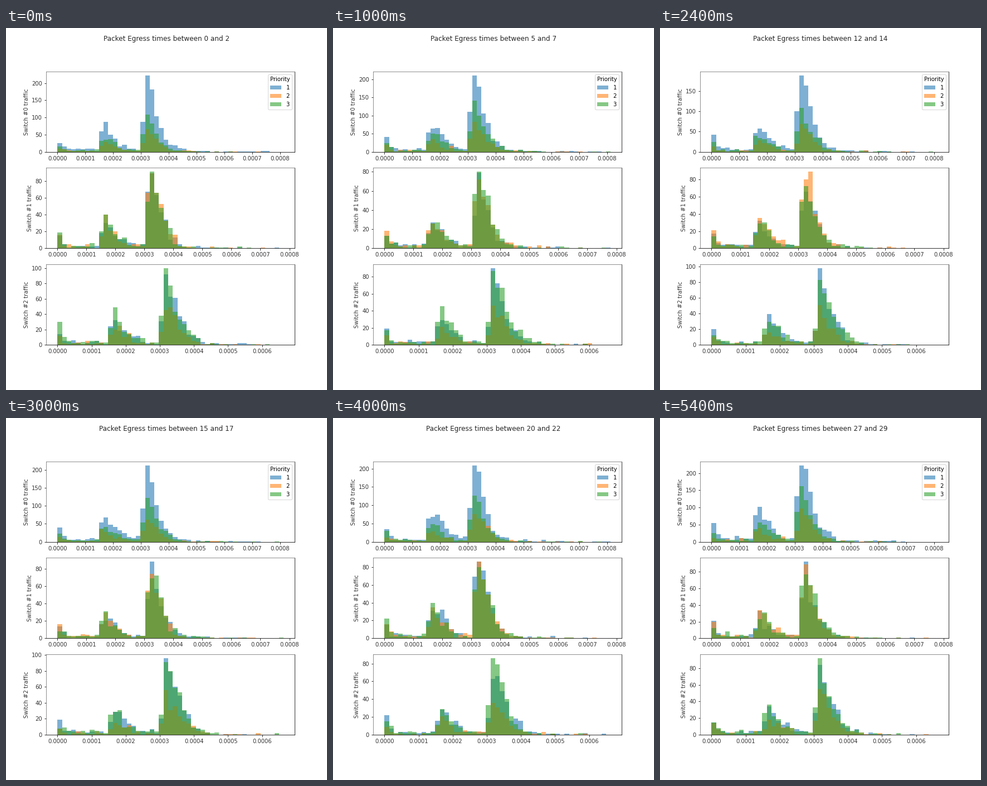
Recreate the animation shown at these times as a matplotlib script. Size 576 by 648 pixels, loop 5.6 s.

```python
import matplotlib.pyplot as plt
import numpy as np
from matplotlib.animation import FuncAnimation

STEPS, BINS = 28, 49
COLORS = ["#1f77b4", "#ff7f0e", "#2ca02c"]
KEY_STEPS = [0, 5, 9, 12, 17, 23, 27]

rng = np.random.default_rng(11)
k = np.arange(BINS)

plt.rcParams.update({
    "font.family": "DejaVu Sans", "font.size": 10,
    "xtick.labelcolor": "0.2", "ytick.labelcolor": "0.2",
    "axes.labelcolor": "0.2",
})


def lump(start, first, height, width):
    """A half-filled first bin, then a sharp top falling off to the right."""
    n = np.maximum(k - start - 1, 0)
    fall = height * np.exp(-(n / width) ** 1.5)
    return np.where(k > start, fall, first * (k == start))


def profile(hump, peak):
    """Expected share of each bin, relative to the tallest one."""
    start = 0.16 * np.exp(-1.4 * k)
    floor = 0.033 * np.exp(-np.maximum(k - peak[0] - 6, 0) / 6)
    return start + floor + lump(*hump) + lump(*peak)


def traffic(hump, peak, shares, tops):
    """Counts by step, priority and bin; neighbouring windows overlap."""
    top = np.interp(np.arange(STEPS), KEY_STEPS, tops)
    mean = np.outer(shares, profile(hump, peak)) * np.mean(tops)
    units = rng.poisson(mean / 2, (STEPS + 1, 3, BINS))
    counts = units[:-1] + units[1:]
    scale = top / counts.max(axis=(1, 2))
    return np.round(counts * scale[:, None, None])


# Longest time on the axis, then the counts of each switch.
switches = [
    (0.000813, traffic((9, 0.27, 0.33, 2.9), (18, 0.44, 0.97, 2.75),
                       (1, 0.36, 0.56),
                       (223, 211, 227, 189, 229, 189, 223))),
    (0.000780, traffic((9, 0.16, 0.32, 2.9), (19, 0.6, 0.95, 2.75),
                       (1, 1, 1),
                       (91, 80, 93, 89, 87, 85, 92))),
    (0.000663, traffic((11, 0.19, 0.35, 2.9), (22, 0.28, 0.94, 3.5),
                       (0.93, 0.53, 1),
                       (100, 90, 91, 98, 94, 77, 92))),
]

fig, axes = plt.subplots(3, 1, figsize=(8, 9), dpi=72)
fig.subplots_adjust(left=0.125, right=0.9, bottom=0.125, top=0.88, hspace=0.2)
title = fig.suptitle("", fontsize=12, color="0.15")

bars = []
for i, (ax, (span, _)) in enumerate(zip(axes, switches)):
    edges = np.linspace(0, span, BINS + 1)
    bars.append([
        ax.bar(edges[:-1], np.zeros(BINS), np.diff(edges), align="edge",
               color=color, alpha=0.575, linewidth=0, label=str(p + 1))
        for p, color in enumerate(COLORS)
    ])
    ax.set_xlim(-0.05 * span, 1.05 * span)
    ax.set_ylabel(f"Switch #{i} traffic")
    for side in ("top", "left"):
        ax.spines[side].set_color("0.45")
axes[0].legend(title="Priority", loc="upper right")


def draw(step):
    title.set_text(f"Packet Egress times between {step} and {step + 2}")
    for ax, groups, (_, counts) in zip(axes, bars, switches):
        for group, heights in zip(groups, counts[step]):
            for rect, height in zip(group, heights):
                rect.set_height(height)
        ax.set_ylim(0, 1.05 * counts[step].max())


anim = FuncAnimation(fig, draw, frames=STEPS, init_func=lambda: draw(0),
                     interval=200, repeat=True, repeat_delay=0)
plt.show()
```
